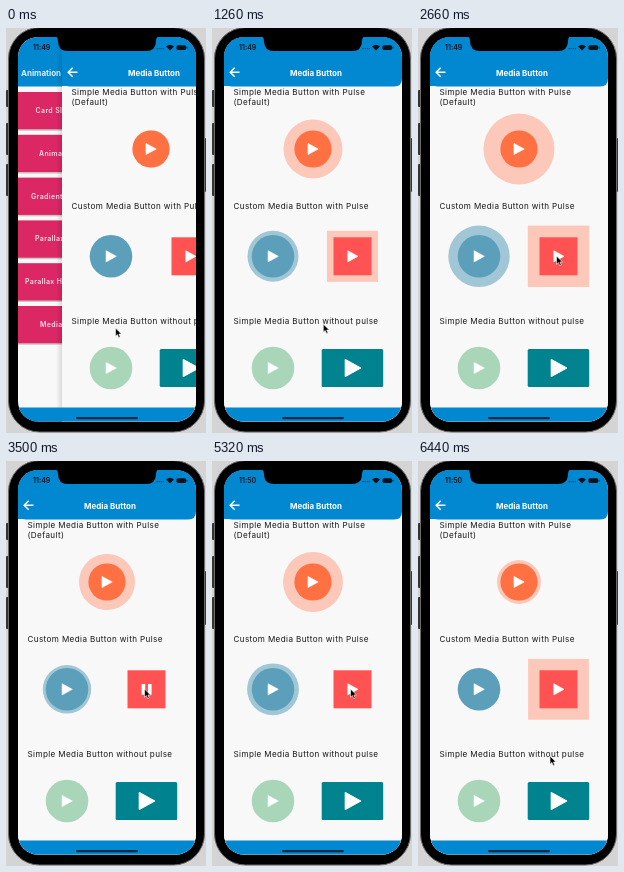
Animation, 200 px wide and 405 px high, one loop 6580 ms. Source, as an HTML page:

```html
<!DOCTYPE html>
<html lang="en">
<head>
<meta charset="utf-8">
<title>Media Button</title>
<style>
  html, body { margin: 0; width: 100%; height: 100%; overflow: hidden; background: #d4d4d4; }
  svg { display: block; width: 100%; height: 100%; }
  text { font-family: Inter, Roboto, sans-serif; }
  .label { font-size: 8.1px; letter-spacing: .38px; fill: #161616; }
  .title { font-size: 8px; font-weight: 700; fill: #fff; }
  .item { font-size: 7px; font-weight: 600; letter-spacing: .35px; fill: #fbdce6; }
</style>
</head>
<body>
<svg viewBox="0 0 200 405">
  <defs>
    <clipPath id="screen"><rect x="12" y="9" width="178" height="384.5" rx="20"/></clipPath>
    <path id="play" d="M-4.6-5.6 5.6 0-4.6 5.6Z" fill="#fff" stroke="#fff" stroke-width=".6" stroke-linejoin="round"/>
    <linearGradient id="edge"><stop offset="0" stop-color="#000" stop-opacity="0"/><stop offset="1" stop-color="#000" stop-opacity=".12"/></linearGradient>
  </defs>

  <!-- phone body -->
  <g fill="#333">
    <rect x="0" y="62" width="4" height="17" rx="1"/>
    <rect x="0" y="95" width="4" height="32" rx="1"/>
    <rect x="0" y="136" width="4" height="32" rx="1"/>
    <rect x="196" y="110" width="4" height="54" rx="1"/>
  </g>
  <rect x="2.5" y="-.5" width="196" height="404.5" rx="31" fill="#000" stroke="#6b6b6b"/>

  <g clip-path="url(#screen)">
    <rect x="12" y="9" width="178" height="385" fill="#f8f8f8"/>
    <g id="back">
      <rect x="-50" y="9" width="250" height="49.5" fill="#0288d1"/>
      <text class="title" x="15" y="47.5" opacity=".88">Animation</text>
      <g id="items"></g>
    </g>
    <g id="page">
      <rect x="6" y="9" width="6" height="385" fill="url(#edge)"/>
      <rect x="12" y="58" width="178" height="336" fill="#f8f8f8"/>
      <path d="M12 9H190V50.5Q190 58.5 182 58.5H20Q12 58.5 12 50.5Z" fill="#0288d1"/>
      <path d="M27.5 44.3H18.5M22.7 39.8 18.2 44.3 22.7 48.8" fill="none" stroke="#fff" stroke-width="1.5"/>
      <text class="title" x="104" y="47.5" text-anchor="middle">Media Button</text>

      <text class="label" x="21.5" y="67">Simple Media Button with Pulse</text>
      <text class="label" x="21.5" y="77">(Default)</text>
      <text class="label" x="21.5" y="181">Custom Media Button with Pulse</text>
      <text class="label" x="21.5" y="295.5">Simple Media Button without pulse</text>

      <circle id="orangePulse" cx="101" cy="121" fill="#fcc8b9"/>
      <circle cx="101" cy="121" r="18.6" fill="#ff7043"/>
      <use href="#play" x="100.6" y="121"/>

      <circle id="bluePulse" cx="61" cy="228.3" fill="#a1c6d5"/>
      <circle cx="61" cy="228.3" r="21.3" fill="#5b9fba"/>
      <use href="#play" x="60.7" y="228.3"/>

      <rect id="redPulse" fill="#fcc8b9"/>
      <rect x="121.5" y="209.3" width="38" height="38" fill="#ff5252"/>
      <use id="redPlay" href="#play" x="140.4" y="228.3"/>
      <path id="redPause" d="M135.6 223h3.6v10.8h-3.6zM142 223h3.6v10.8h-3.6z" fill="#fff"/>

      <circle cx="61" cy="340" r="21.3" fill="#a9d5b9"/>
      <use href="#play" x="60.7" y="340"/>
      <rect x="109.7" y="321" width="61.5" height="38" rx="1.5" fill="#00838f"/>
      <use href="#play" transform="translate(140.3 340) scale(1.55)"/>
    </g>
    <rect x="12" y="379.5" width="178" height="15" fill="#0288d1"/>
    <rect x="70" y="389" width="62" height="2.2" rx="1.1" fill="#072c44"/>

    <!-- status bar -->
    <path d="M49 8Q52 9 52 13Q52 23 62 23H140Q150 23 150 13Q150 9 153 8Z"/>
    <text id="clock" x="27" y="22.3" font-size="7" font-weight="600" fill="#06131d"></text>
    <g fill="#06131d">
      <path d="M150.5 20h1.2v1.2h-1.2zM152.6 20h1.2v1.2h-1.2zM154.7 20h1.2v1.2h-1.2zM156.8 20h1.2v1.2h-1.2z" opacity=".5"/>
      <path d="M160 18.6Q164 15 168 18.6L164 22.6Z"/>
      <rect x="170.5" y="17.3" width="9.5" height="4.8" rx="1.4"/>
      <rect x="180.5" y="18.8" width=".8" height="1.8"/>
    </g>
  </g>

  <path id="cursor" d="M0 0V8.2L1.9 6.5 3.2 9.5 4.7 8.9 3.4 6H6Z" fill="#000" stroke="#fff" stroke-width=".6"/>
</svg>
<script>
const LOOP = 6580, STEP = 140;
const PAUSE_AT = 2940, RESUME_AT = 5250, MINUTE_AT = 5040;
const $ = id => document.getElementById(id);

const items = [["Card Slider", 29.5], ["Animated", 33], ["Gradient", 25],
  ["Parallax", 29], ["Parallax Header", 19], ["Media", 34]];
$("items").innerHTML = items.map(([name, x], i) => {
  const y = 64 + i * 42.8;
  return `<rect x="-50" y="${y + 1}" width="240" height="37.8" fill="#c9c9c9"/>
    <rect x="-50" y="${y}" width="240" height="37.3" fill="#dc2765"/>
    <text class="item" x="${x}" y="${y + 21}">${name}</text>`;
}).join("");

// Pulse phase: one unit is a full growth or a full shrink.
const phase = [[0, 0], [1260, 1.406], [2660, 3.08], [3500, 4.514],
  [4480, 5.54], [5320, 6.62], [6440, 7.81], [6580, 7.96]];
const pointer = [[0, 109.5, 300], [1120, 110.5, 300], [1260, 111.3, 296], [1960, 112, 294],
  [2240, 118, 280], [2520, 138.5, 228], [5740, 138.5, 228], [6160, 134, 286], [6440, 132, 295]];

function track(keys, t) {
  const i = keys.findIndex(k => k[0] > t);
  if (i < 0) return keys[keys.length - 1].slice(1);
  const a = keys[i - 1], b = keys[i], p = (t - a[0]) / (b[0] - a[0]);
  return a.slice(1).map((v, j) => v + (b[j + 1] - v) * p);
}

const swell = x => 1 - Math.abs(1 - x % 2) / 2;

function set(id, attrs) {
  for (const k in attrs) $(id).setAttribute(k, attrs[k]);
}

function draw(t) {
  const slide = t < 420 ? 44 * (1 - t / 420) ** 3 : 0;
  set("page", { transform: `translate(${slide} 0)` });
  set("back", { transform: `translate(${(slide - 44) / 3} 0)` });

  const size = swell(track(phase, t)[0]);
  set("orangePulse", { r: 37 * size });
  set("bluePulse", { r: 32 * size });

  const paused = t >= PAUSE_AT && t < RESUME_AT;
  const half = paused ? 0 : 32 * (t < PAUSE_AT ? size : swell((t - RESUME_AT) * 1.1 / 1190));
  set("redPulse", { x: 140.5 - half, y: 228.3 - half, width: 2 * half, height: 2 * half });
  set("redPlay", { visibility: paused ? "hidden" : "visible" });
  set("redPause", { visibility: paused ? "visible" : "hidden" });

  $("clock").textContent = t < MINUTE_AT ? "11:49" : "11:50";
  set("cursor", { transform: `translate(${track(pointer, t)})` });
}

const start = performance.now();
function tick() {
  const t = (performance.now() - start) % LOOP;
  draw(Math.floor(t / STEP) * STEP);
  requestAnimationFrame(tick);
}
tick();
</script>
</body>
</html>
```
